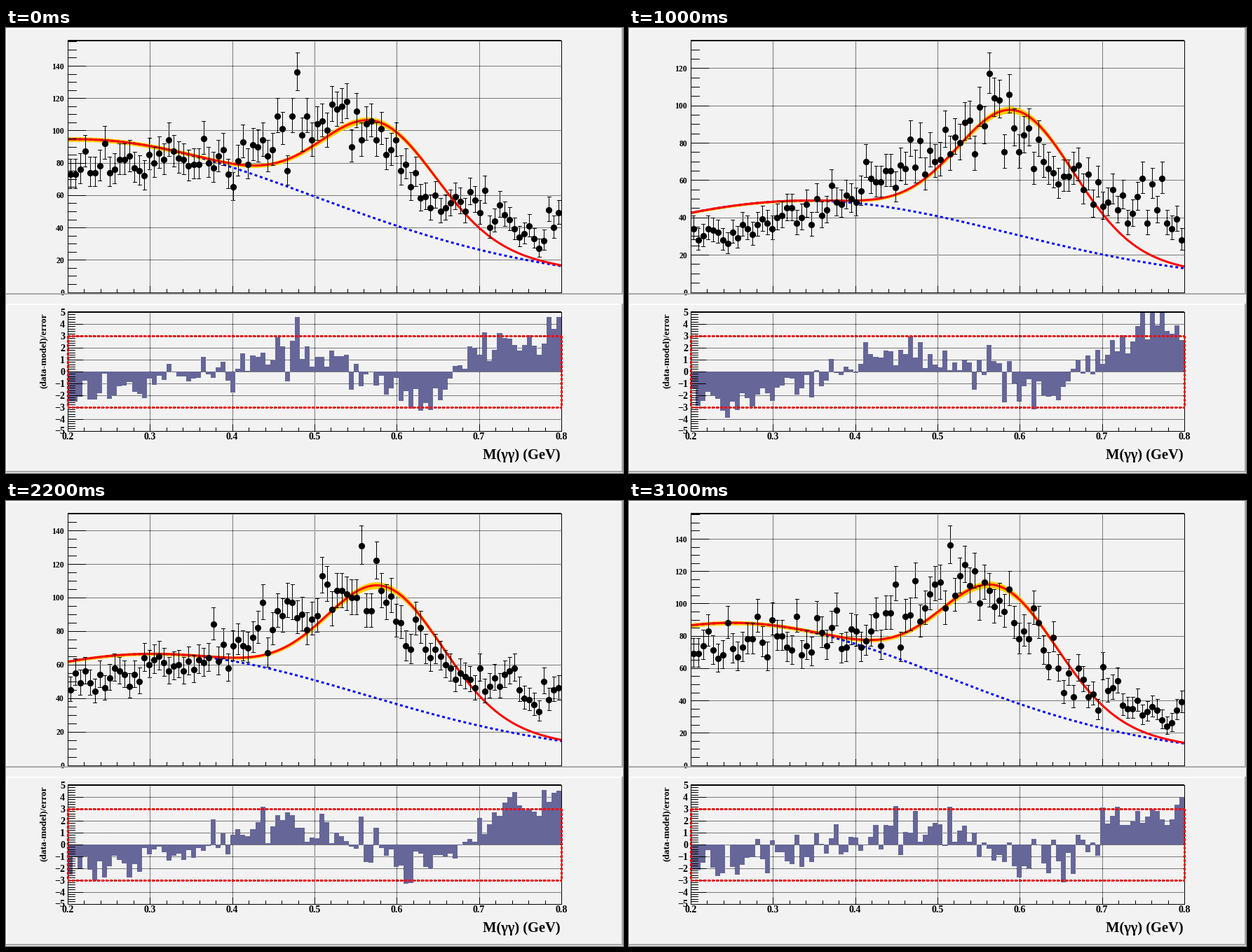
A matplotlib script that plays this animation: 880 by 636 pixels, repeating every 3.4 s.

```python
import numpy as np
import matplotlib.pyplot as plt
from matplotlib.animation import ArtistAnimation
from matplotlib.collections import LineCollection, PolyCollection
from matplotlib.patches import Rectangle

PX = 0.72                      # points per pixel at 100 dpi
X0, X1 = 88.0, 792.0           # plot sides
TOP, BASE = 18.0, 377.5        # upper panel
RTOP, RBASE = 406.0, 575.5     # residual panel
BINS, STATES = 100, 12
FACE, BAR, GOLD = "#f2f2f2", "#666699", "#ffcc00"
SERIF = dict(family="Liberation Serif", weight="bold")
DOTTED = (0, (1, 2))

# Key fits, blended in between. For each state: background height, centre
# and spread, peak height and mean, largest count.
FITS = {
    0: (89.6, 0.21, 0.167, 60.4, 0.579, 136),
    2: (72.0, 0.31, 0.105, 69.9, 0.580, 132),
    4: (44.0, 0.34, 0.122, 66.5, 0.596, 117),
    6: (45.2, 0.40, 0.128, 72.3, 0.598, 106),
    7: (44.8, 0.335, 0.124, 66.7, 0.598, 114),
    9: (78.0, 0.27, 0.140, 69.6, 0.574, 148),
    11: (83.0, 0.25, 0.132, 68.4, 0.576, 136),
}
FLOOR, SIGMA = 5, 0.07

mass = np.linspace(0.2, 0.8, 241)
mid = 0.2 + 0.6 * (np.arange(BINS) + 0.5) / BINS

fig = plt.figure(figsize=(8.8, 6.36), dpi=100, facecolor=FACE)
ax = fig.add_axes([0, 0, 1, 1])
ax.set_xlim(0, 880)
ax.set_ylim(636, 0)
ax.axis("off")


def px(m):
    return X0 + (np.asarray(m) - 0.2) / 0.6 * (X1 - X0)


def py_pull(p):
    return RBASE - (np.asarray(p) + 5) / 10 * (RBASE - RTOP)


def lines(segs, color="black", width=1, style="solid", z=2):
    art = LineCollection(segs, colors=color, linewidths=width * PX,
                         linestyles=[style], antialiaseds=False, zorder=z)
    return ax.add_collection(art)


def hline(y, a=X0, b=X1):
    return [(a, y), (b, y)]


def vline(x, a, b):
    return [(x, a), (x, b)]


def label(x, y, text, size, ha="right", va="center_baseline", **kw):
    return ax.text(x, y, text, fontsize=size * PX, ha=ha, va=va, zorder=6,
                   **SERIF, **kw)


def bevel(top, bottom):
    """Raised pad edge: light on the top and left, dark on the others."""
    for x, y, w, h, c in ((0, top, 880, 2, "white"),
                          (0, top, 2, bottom - top, "white"),
                          (0, bottom - 2, 880, 2, "#a8a8a8"),
                          (878, top, 2, bottom - top, "#a8a8a8")):
        ax.add_patch(Rectangle((x, y), w, h, fc=c, lw=0, zorder=8,
                               antialiased=False))


def draw_static():
    bevel(0, 381)
    bevel(394, 635)
    grid, ticks = [], []
    for i in range(31):
        x = px(0.2 + 0.02 * i)
        major = i % 5 == 0
        for base in (BASE, RBASE):
            ticks.append(vline(x, base, base - (10 if major else 5)))
        if major:
            label(x, 588, f"{0.2 + 0.02 * i:.1f}", 14, "center", "baseline")
            if 0 < i < 30:
                grid += [vline(x, TOP, BASE), vline(x, RTOP, RBASE)]
    for i in range(51):
        y = py_pull(-5 + 0.2 * i)
        major = i % 5 == 0
        ticks.append(hline(y, X0, X0 + (21 if major else 10)))
        if major:
            grid.append(hline(y))
            label(84, y, str(i // 5 - 5).replace("-", "\u2212"), 14)
    for top, base in ((TOP, BASE), (RTOP, RBASE)):
        ticks += [hline(base), vline(X0, top, base), vline(X1, top, base)]
    lines(grid, style=DOTTED, z=1)
    lines(ticks, z=5)
    lines([hline(TOP), hline(RTOP)], width=2, z=5)
    lo, hi = py_pull(-3), py_pull(3)
    lines([hline(lo), hline(hi), vline(X0, hi, lo), vline(X1, hi, lo)],
          "red", 3, (0, (1, 0.7)), 7)
    label(791, 616, "M(\u03b3\u03b3) (GeV)", 20.5, "right", "baseline")
    label(54, 461, "(data-model)/error", 13.4, "center", "center", rotation=90)


def fit(state):
    return [np.interp(state, list(FITS), col) for col in zip(*FITS.values())]


def curves(state, m):
    height, centre, spread, peak, mean, _ = fit(state)
    back = FLOOR + height * np.exp(-(m - centre) ** 2 / spread)
    return back, peak * np.exp(-0.5 * ((m - mean) / SIGMA) ** 2)


def mean_pull(state):
    """The further the background shifts, the worse both ends are fitted."""
    shift = ((fit(state)[1] - 0.21) / 0.19) ** 2
    left, right = -1.5 - 2.9 * shift, 2.6 + 2.2 * shift
    return np.interp(mid, [0.25, 0.38, 0.46, 0.5, 0.57, 0.61, 0.65, 0.7, 0.75],
                     [left, 0, 1.4, 1.2, 0, -1.8, -1.7, 1.5, right])


def counts(state):
    """Poisson-like counts scattered around the mean pull."""
    rng = np.random.default_rng(40 + state)
    model = sum(curves(state, mid))
    pull = mean_pull(state) + np.clip(rng.normal(0, 0.9, BINS), -2.2, 2.2)
    n = np.round(((pull + np.sqrt(pull ** 2 + 4 * model)) / 2) ** 2)
    most = round(fit(state)[-1])
    n[n.argmax()] = most
    return np.clip(n, 4, most), model


def errors(n):
    big = n > 100
    low = np.where(big, np.sqrt(n + 0.25) - 0.5, np.sqrt(n - 0.25))
    high = np.where(big, np.sqrt(n + 0.25) + 0.5, np.sqrt(n + 0.75) + 1)
    return low, high


def draw_state(state):
    n, model = counts(state)
    low, high = errors(n)
    ymax = 1.05 * (n + high).max()

    def py(v):
        return BASE - np.asarray(v) / ymax * (BASE - TOP)

    arts, grid, ticks = [], [], []
    for v in range(0, int(ymax) + 1, 5):
        major = v % 20 == 0
        ticks.append(hline(py(v), X0, X0 + (25 if major else 12)))
        if major:
            grid.append(hline(py(v)))
            arts.append(label(83, py(v), str(v), 11.6))
    arts += [lines(grid, style=DOTTED, z=1), lines(ticks, z=5)]

    back, peak = curves(state, mass)
    total = back + peak
    half = 0.015 * total + 0.006 * peak
    arts.append(ax.fill_between(px(mass), py(total - half), py(total + half),
                                color=GOLD, lw=0, zorder=2))
    arts += ax.plot(px(mass), py(back), color="blue", lw=3 * PX,
                    ls=(0, (1.3, 1.3)), dash_capstyle="butt", zorder=2.5)
    arts += ax.plot(px(mass), py(total), color="red", lw=3 * PX,
                    solid_capstyle="butt", zorder=3)

    bars = []
    for x, a, b in zip(px(mid), py(n + high), py(n - low)):
        bars += [vline(x, a, b), hline(a, x - 2.5, x + 2.5),
                 hline(b, x - 2.5, x + 2.5)]
    arts.append(lines(bars, z=4))
    arts.append(ax.scatter(px(mid), py(n), s=(9.2 * PX) ** 2, c="black",
                           lw=0, zorder=4))

    # Pulls under the panel are left out, those over it are cut off.
    boxes = []
    zero, step = py_pull(0), (X1 - X0) / BINS
    for i, p in enumerate((n - model) / low):
        if p >= -5:
            a, b = X0 + step * i, X0 + step * (i + 1)
            y = py_pull(min(p, 5))
            boxes.append([(a, zero), (b, zero), (b, y), (a, y)])
    arts.append(ax.add_collection(PolyCollection(
        boxes, facecolors=BAR, linewidths=0, antialiaseds=False, zorder=3)))
    return arts


draw_static()
scenes = [draw_state(s) for s in range(STATES)]
# The first state lasts one tick of 100 ms, every other one three.
frames = [scenes[(k + 2) // 3] for k in range(34)]
anim = ArtistAnimation(fig, frames, interval=100, repeat=True, repeat_delay=0)
plt.show()
```
